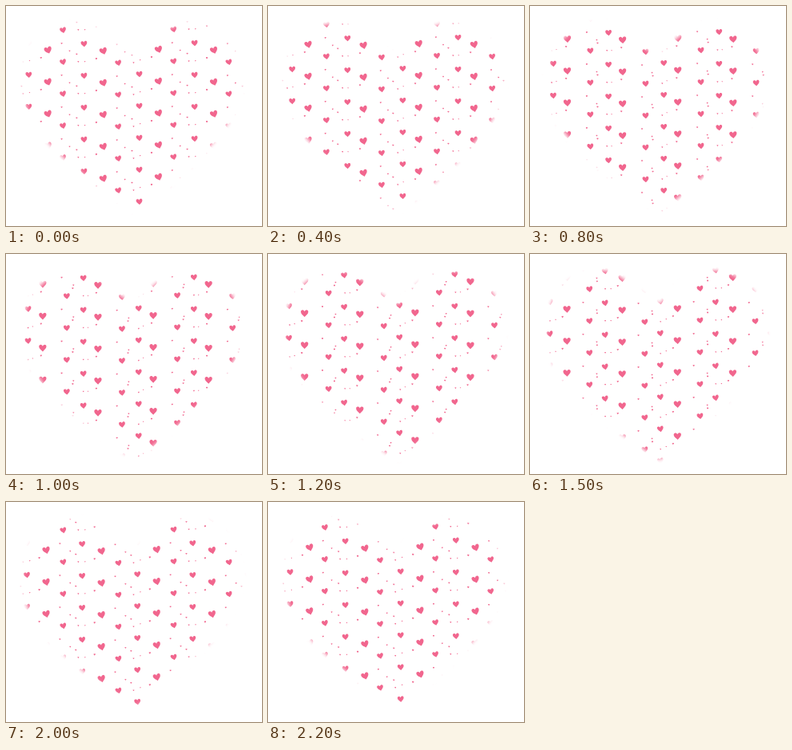
These frames come from a looping animation (320x276 px, 2300 ms). An HTML page with a canvas:

```html
<!DOCTYPE html>
<html lang="en">
<head>
<meta charset="utf-8">
<title>Drifting hearts</title>
<style>
  html, body { margin: 0; width: 100%; height: 100%; overflow: hidden; background: #fff; }
  canvas { display: block; width: 320px; height: 276px; }
</style>
</head>
<body>
<canvas id="stage" width="320" height="276"></canvas>
<script>
const W = 320, H = 276;
const LOOP = 2300, STEP = 100;
const TILE_X = 69.1, TILE_Y = 40;
const BAND_SHIFT = [0, 1.2, -0.8, 0.2];
const PINK = '#f1668e';

const ctx = document.getElementById('stage').getContext('2d');

const heart = new Path2D(
  'M0 .5C-.2 .28-.5 .1-.5-.17C-.5-.5-.12-.52 0-.22' +
  'C.12-.52 .5-.5 .5-.17C.5 .1 .2 .28 0 .5Z');

const outline = new Path2D(
  'M163 63C176 46 200 21 232 21C264 21 295 54 295 95' +
  'C295 140 245 188 215 215C195 232 178 247 162 258' +
  'C145 247 118 228 96 211C62 182 20 145 20 98' +
  'C20 53 49 21 92 21C114 21 138 55 163 63Z');

// x: centre of sway, y: height at time 0, peak: time of the rightmost point,
// bend: second harmonic of the sway, tilt and rock: angle in degrees
const parts = [
  { x: 73.6, y: 30.1, size: 7.8, sway: 2.4, peak: 1050, tilt: -9, rock: 4 },
  { x: 27.5, y: 6.2, size: 7.8, sway: 2.8, peak: 450, tilt: -7, rock: 4 },
  { x: 48.6, y: 15.2, size: 9.3, sway: 3.5, peak: 50, bend: 0.6, tilt: -9, rock: -9 },
  { x: 69, y: 6.9, size: 2.1, sway: 2.8, peak: 500 },
  { x: 43.2, y: 24.9, size: 2.3, sway: 2.8, peak: 500 },
  { x: 82, y: 16.4, size: 1.9, sway: 2.5, peak: 1150 },
  { x: 85.7, y: 20.4, size: 2.1, sway: 2.7, peak: 50 },
  { x: 93.4, y: 29.8, size: 1.8, sway: 3.3, peak: 1000 },
  { x: 31.4, y: 28.5, size: 1.4, sway: 2, peak: 1050 }
];

const mask = document.createElement('canvas');
mask.width = W;
mask.height = H;
const maskCtx = mask.getContext('2d');
maskCtx.filter = 'blur(2.6px)';
maskCtx.fill(outline);

function drawHeart(x, y, size, angle) {
  ctx.save();
  ctx.translate(x, y);
  ctx.rotate(angle * Math.PI / 180);
  ctx.scale(size, size);
  ctx.fill(heart);
  ctx.restore();
}

function drawPart(p, time) {
  const phase = 2 * Math.PI * (time - p.peak) / LOOP;
  const x = p.x + p.sway * Math.cos(phase) + (p.bend || 0) * Math.cos(2 * phase);
  const y = p.y - TILE_Y * time / LOOP;
  const angle = (p.tilt || 0) + (p.rock || 0) * Math.cos(phase);
  for (let col = -1; col < 5; col++) {
    const shift = BAND_SHIFT[(col + 4) % 4];
    for (let row = 0; row < 9; row++) {
      drawHeart(x + col * TILE_X, y + shift + row * TILE_Y, p.size, angle);
    }
  }
}

function draw(now) {
  const time = Math.floor(now % LOOP / STEP) * STEP;
  ctx.clearRect(0, 0, W, H);
  ctx.fillStyle = PINK;
  for (const p of parts) drawPart(p, time);
  ctx.globalCompositeOperation = 'destination-in';
  ctx.drawImage(mask, 0, 0);
  ctx.globalCompositeOperation = 'source-over';
}

let start;
function tick(now) {
  if (start === undefined) start = now;
  draw(Math.max(0, now - start));
  requestAnimationFrame(tick);
}
draw(0);
requestAnimationFrame(tick);
</script>
</body>
</html>
```
